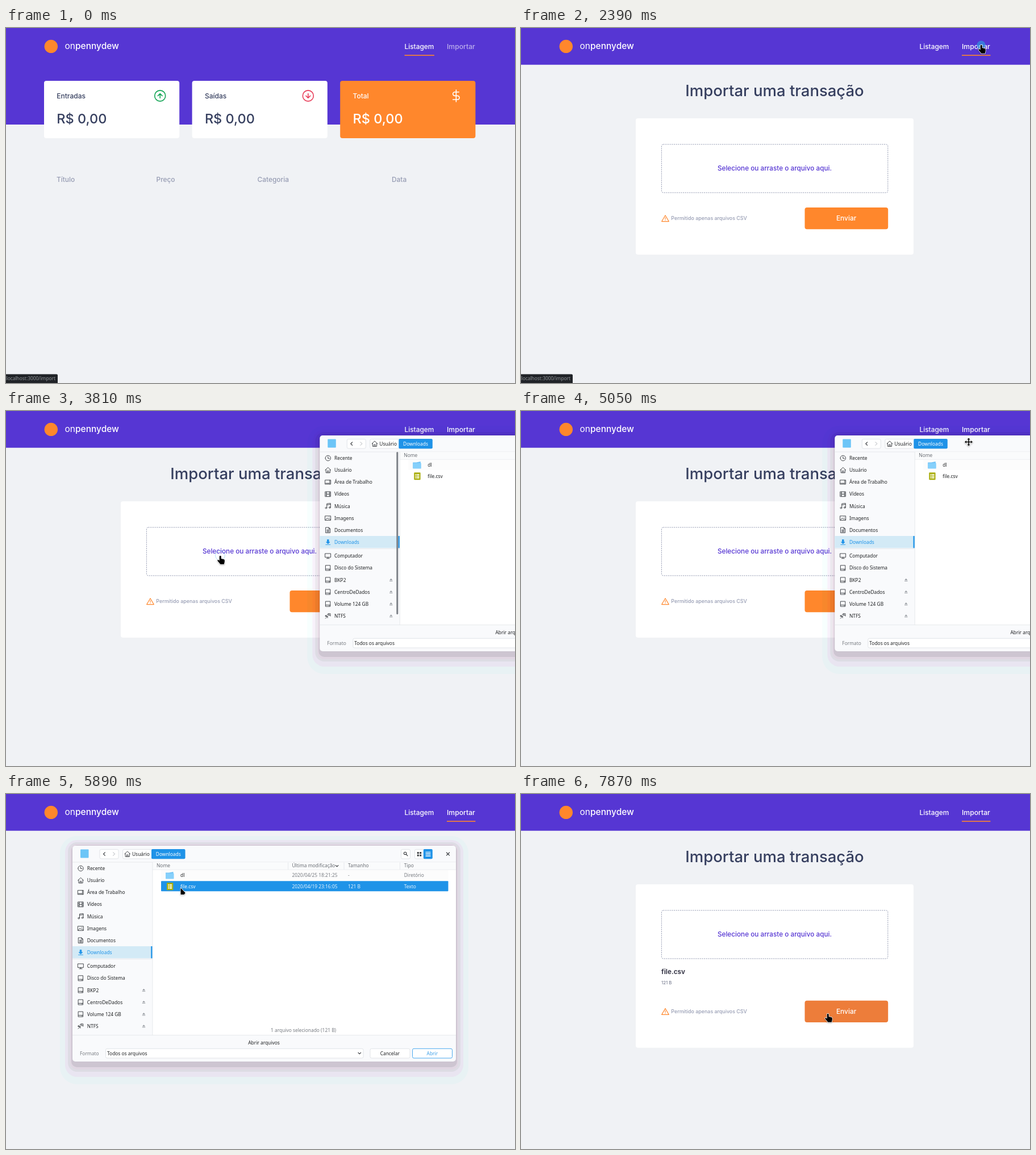
These frames come from a looping animation (896x625 px, 8 s). An HTML page:

```html
<!DOCTYPE html>
<html lang="pt-BR">
<head>
<meta charset="utf-8">
<title>onpennydew</title>
<style>
  html, body { margin: 0; width: 100%; height: 100%; overflow: hidden; background: #f0f2f5; }
  svg { display: block; width: 100%; height: 100%; }
  text { font-family: Inter, "Open Sans", sans-serif; font-weight: 500; white-space: pre; }
  .sys text { font-family: "Noto Sans", "Open Sans", sans-serif; font-size: 8.4px; font-weight: 400; }
  .line { fill: none; stroke-linecap: round; stroke-linejoin: round; }
</style>
</head>
<body>
<svg id="stage" viewBox="0 0 896 625" preserveAspectRatio="none"></svg>
<script>
const LOOP = 8000;
const PURPLE = '#5636d3', ORANGE = '#ff872c', INK = '#363f5f', MUTED = '#969cb3', BLUE = '#1f93e8';

const text = (x, y, s, size, fill, extra = '') =>
  `<text x="${x}" y="${y}" font-size="${size}" fill="${fill}" ${extra}>${s}</text>`;
const rect = (x, y, w, h, fill, r = 0, extra = '') =>
  `<rect x="${x}" y="${y}" width="${w}" height="${h}" rx="${r}" fill="${fill}" ${extra}/>`;
const path = (d, stroke, width = 1, extra = '') =>
  `<path class="line" d="${d}" stroke="${stroke}" stroke-width="${width}" ${extra}/>`;
const group = (id, body, extra = '') => `<g id="${id}" ${extra}>${body}</g>`;
const at = (x, y, body, scale = 1) => `<g transform="translate(${x} ${y}) scale(${scale})">${body}</g>`;
const MID = 'text-anchor="middle"';

// Listing page
const CIRCLE = 'M2 12a10 10 0 1 0 20 0a10 10 0 1 0-20 0';
const UP = CIRCLE + 'M16 12L12 8L8 12M12 16V8';
const DOWN = CIRCLE + 'M8 12L12 16L16 12M12 8V16';
const DOLLAR = 'M12 1V23M17 5H9.5a3.5 3.5 0 0 0 0 7h5a3.5 3.5 0 0 1 0 7H6';

function card(x, label, icon, color, fill, ink) {
  return rect(x, 93, 238.2, 101, fill, 4) +
    text(x + 22.3, 124, label, 12, ink) +
    text(x + 22.3, 168, 'R$ 0,00', 23.5, ink) +
    at(x + 192.8, 108, path(icon, color, 1.7), .95);
}

const listing = rect(0, 0, 896, 170, PURPLE) +
  card(67, 'Entradas', UP, '#12a454', '#fff', INK) +
  card(327.6, 'Saídas', DOWN, '#e83f5b', '#fff', INK) +
  card(588.2, 'Total', DOLLAR, '#fff', ORANGE, '#fff') +
  [['Título', 89], ['Preço', 264.5], ['Categoria', 442.5], ['Data', 679]]
    .map(([s, x]) => text(x, 271, s, 11.9, MUTED)).join('');

// Import page
const importing = rect(0, 0, 896, 64.7, PURPLE) +
  text(446.5, 120, 'Importar uma transação', 27.5, INK, MID) +
  rect(202, 159, 489, 240, '#fff', 4, 'id="panel"') +
  rect(247.4, 204.9, 398.4, 85, 'none', 3, `stroke="${MUTED}" stroke-dasharray="2.2 1.5"`) +
  text(446.5, 251.2, 'Selecione ou arraste o arquivo aqui.', 11.75, PURPLE, MID) +
  group('file', text(247, 317, 'file.csv', 11.6, '#3d3d4d', 'font-weight="700" style="font-weight:700"') +
    text(247, 334.5, '121 B', 7.8, '#7c8194')) +
  group('actions',
    path('M254 329.8L260.3 340.6H247.7ZM254 333.6V336.6M254 338.4V338.6', ORANGE, 1.1) +
    text(264.3, 338.3, 'Permitido apenas arquivos CSV', 8.9, MUTED) +
    rect(499.5, 316, 146.7, 38.3, ORANGE, 4, 'id="send"') +
    text(572.6, 339.3, 'Enviar', 11.9, '#fff', MID));

const header = `<circle cx="79.3" cy="32.4" r="11.7" fill="${ORANGE}"/>` +
  `<text x="103.5" y="37" font-size="15.5" fill="#fff"><tspan style="font-weight:400">on</tspan><tspan>pennydew</tspan></text>` +
  group('navList', text(701.5, 36.9, 'Listagem', 11.9, '#fff') +
    rect(701.5, 47.3, 52.4, 1.6, ORANGE, 0, 'id="lineList"')) +
  group('navImport', text(776, 36.9, 'Importar', 12.2, '#fff') +
    rect(776, 47.3, 50.4, 1.6, ORANGE, 0, 'id="lineImport"'));

// File chooser, drawn from its own top left corner
const DARK = '#33363a', GREY = '#787c82', EDGE = '#e1e4e8';
const HOME = 'M-5 0L0-4.8L5 0M-3.6-1V4.6H3.6V-1M-1.2 4.6V1.4H1.2V4.6';
const DISK = 'M-4-4.5H4V4.5H-4ZM-4 2H4M1.8 3.3H2.4';
const PLACES = [
  ['Recente', 'M-4.7 0a4.7 4.7 0 1 0 9.4 0a4.7 4.7 0 1 0-9.4 0M0-2.8V.4H2.6'],
  ['Usuário', HOME],
  ['Área de Trabalho', 'M-4.8-3.6H4.8V3.6H-4.8ZM3-3.4V3.4M-4 2H2'],
  ['Vídeos', 'M-4.6-4.3H4.6V4.3H-4.6ZM-2.4-4V4M2.4-4V4M-2.4 0H2.4M-4.4-1.6H-2.6M-4.4 1.6H-2.6M2.6-1.6H4.4M2.6 1.6H4.4'],
  ['Música', 'M-2 3V-4.3L4.5-5V2.3M-2-2.2L4.5-3M-2 3.2a1.4 1.2 0 1 0-2.8 0a1.4 1.2 0 1 0 2.8 0M4.5 2.4a1.4 1.2 0 1 0-2.8 0a1.4 1.2 0 1 0 2.8 0'],
  ['Imagens', 'M-4.8-3.8H4.8V3.8H-4.8ZM-4 3L-1.3-.4L.8 2L2.2.6L4 3M1.8-1.6H2.4'],
  ['Documentos', 'M-3.8-4.7H1.6L3.8-2.4V4.7H-3.8ZM1.4-4.5V-2.2H3.6M-2-.4H2M-2 1.3H2M-2 3H2'],
  ['Downloads', 'M-1.3-4V0H-3.2L0 3L3.2 0H1.3V-4ZM-4 4.4H4'],
  ['Computador', 'M-4.8-4.2H4.8V2.3H-4.8ZM-2.6 4.5H2.6M0 2.5V4.3'],
  ['Disco do Sistema', DISK], ['BKP2', DISK], ['CentroDeDados', DISK], ['Volume 124 GB', DISK],
  ['NTFS', 'M-4.4 4.4L2 -2M.4-4H4.2V0ZM-3.2 .3L-1 1L-.6 3.4M-4.2-.8H-2.6V.8H-4.2ZM-1.4-2.4H.2']
];

const places = PLACES.map(([name, icon], i) => {
  const y = 40 + i * 21.12 + (i > 7 ? 3.2 : 0), here = i === 7;
  return (here ? rect(0, y - 10.8, 140, 21.2, '#d3eaf6') + rect(138.2, y - 10.8, 2.3, 21.2, BLUE) : '') +
    at(14.5, y, path(icon, here ? BLUE : DARK, .9, here ? `style="fill:${BLUE}"` : '')) +
    text(25.7, y + 3.1, name, 8.4, here ? BLUE : '#202224') +
    (i > 9 ? `<path d="M122.8 ${y + .6}L125.5 ${y - 2.6}L128.2 ${y + .6}ZM122.8 ${y + 1.5}h5.4v1h-5.4z" fill="#9a9ea4"/>` : '');
}).join('');

const row = (y, cells, first, rest) => cells
  .map((s, i) => text([190, 386.5, 485, 583.7][i], y, s, 8.4, i ? rest : first)).join('');
const FILE_CELLS = ['file.csv', '2020/04/19 23:16:05', '121 B', 'Texto'];
const boxed = (x, y, w, h, stroke = EDGE, extra = '') => rect(x, y, w, h, '#fff', 2.5, `stroke="${stroke}" ${extra}`);

const SHADE = [[22, 17, 40, '#f7fffe'], [13, 10, 27, '#f8f2fb'], [8, 6, 18, '#ebe8ee'],
  [4, 3, 14, '#eee2ec'], [2, 1, 10, '#dad0da']];
const shade = SHADE.map(([side, top, foot, c]) =>
  rect(-side, -top, 675 + side * 2, 380 + top + foot, c, side + 8)).join('');

const chooser = `<g style="mix-blend-mode:multiply">${shade}</g>` +
  rect(0, 0, 675, 380, '#f9fafc', 5) +
  rect(0, 28.5, 675, 1, '#e8eaed') +
  rect(14, 6.5, 14.5, 15, '#6cc5f7', 1) +
  boxed(48, 6.5, 33, 16.5) + path('M57.3 11.8L54.5 14.6L57.3 17.4', DARK, 1.2) + path('M71.7 11.8L74.5 14.6L71.7 17.4', '#a8acb2') +
  boxed(88.5, 6.5, 109.5, 16.5) + at(96.7, 14.7, path(HOME, DARK, .9)) +
  text(105, 17.8, 'Usuário', 8.4, '#202224') +
  rect(139, 6, 59.5, 17.3, BLUE, 2) + text(146.8, 17.8, 'Downloads', 8.4, '#fff') +
  boxed(578.5, 6.5, 16, 16.5) + path('M583.4 13.4a2.2 2.2 0 1 0 4.4 0a2.2 2.2 0 1 0-4.4 0M587.2 15L590 17.8', DARK, 1.1) +
  boxed(602.5, 6.5, 31, 16.5) +
  [606.8, 611.2].map(x => [11.2, 15.6].map(y => rect(x, y, 3, 3, DARK)).join('')).join('') +
  rect(617.8, 6, 16, 17.3, BLUE, 2) + path('M622 11.2H630M622 13.6H630M622 16H630M622 18.4H630', '#fff', 1.1) +
  path('M658.4 12L663.6 17.2M663.6 12L658.4 17.2', DARK, 1.1) +
  rect(141, 29.5, 534, 304, '#fff') + rect(141, 29.5, 534, 12.5, '#fafbfc') +
  rect(141, 41.8, 534, .8, '#e8eaed') + rect(140.5, 29, .8, 304.5, EDGE) +
  [379.3, 477.6, 576.2].map(x => rect(x, 29.5, .8, 12.5, EDGE)).join('') +
  [['Nome', 148], ['Última modificação', 386.5], ['Tamanho', 485], ['Tipo', 583.7]]
    .map(([s, x]) => text(x, 38.4, s, 8.4, '#6b6f75')).join('') +
  path('M463.4 34.6L465.6 36.8L467.8 34.6', DARK, 1.2) +
  places + rect(0, 199.2, 140.5, .8, EDGE) +
  rect(135, 29, 3, 286, '#7c8087', 1.5, 'id="bar"') +
  rect(156, 43, 505.5, 18, '#fcfcfc') +
  row(55.1, ['dl', '2020/04/25 18:21:25', '-', 'Diretório'], '#202224', GREY) +
  `<path d="M164 47.5H170L177.5 46V58H164Z" fill="#6cc1f6"/>` + rect(164, 48.5, 14.5, 10, '#86d0fb', .8) +
  group('plain', row(74.7, FILE_CELLS, '#202224', GREY)) +
  group('picked', rect(156, 62.3, 505.5, 18, BLUE, 1) + row(74.7, FILE_CELLS, '#fff', '#e6f3fd') +
    text(406.6, 328.4, '1 arquivo selecionado (121 B)', 8.4, GREY, MID)) +
  rect(166, 65.2, 11.3, 13, '#a9ad0c', 1) + rect(168.2, 68, 7, 7.8, '#f4f5d4') +
  path('M168.4 70.5H175M168.4 73H175M170.5 68.2V75.6', '#a9ad0c', .7) +
  rect(0, 333.3, 675, .8, EDGE) +
  text(337, 349.5, 'Abrir arquivos', 8.4, '#202224', MID) +
  text(13, 368.6, 'Formato', 8.4, GREY) +
  boxed(58.5, 357.3, 453.5, 16.7) + text(61, 368.6, 'Todos os arquivos', 8.4, '#202224') +
  path('M503 364.4L505.3 366.7L507.6 364.4', DARK, 1.2) +
  boxed(524, 357.3, 70, 16.7) + text(558.8, 368.6, 'Cancelar', 8.4, '#202224', MID) +
  boxed(598.5, 357.3, 70, 16.7, '#4aa9ee', 'id="open"') + text(633.4, 368.6, 'Abrir', 8.4, '#3d9fe8', MID);

// Pointer shapes, with the hot spot at 0,0
const SHAPES = {
  arrow: 'M0 0V11.4H6L8.2 8.4Z',
  hand: 'M-1.3 1.2a1.5 1.5 0 0 1 3 0V5L6.3 6Q7.8 6.4 7.8 8V10.5L6.8 14.8H.4L-4 9.4Q-5.4 7.6-4.2 7Q-3 6.5-1.3 8.6Z',
  move: 'M0-7L2.6-4.2H.8V-.8H4.2V-2.6L7 0L4.2 2.6V.8H.8V4.2H2.6L0 7L-2.6 4.2H-.8V.8H-4.2V2.6L-7 0L-4.2-2.6V-.8H-.8V-4.2H-2.6Z'
};

const stage = document.getElementById('stage');
stage.innerHTML = rect(0, 0, 896, 625, '#f0f2f5') +
  group('listing', listing) + group('importing', importing) + header +
  group('status', rect(-3, 609.5, 94, 20, '#202327', 2) +
    text(.5, 620.2, 'localhost:3000/import', 8.4, '#92969a'), 'class="sys"') +
  group('chooser', chooser, 'class="sys"') +
  '<circle id="ripple"/>' +
  group('pointer', '<path id="glyph" fill="#000" stroke="#fff" stroke-width="1.5" stroke-linejoin="round" paint-order="stroke"/>',
    'style="filter:drop-shadow(0 1px 1px rgba(0,0,0,.3))"');

const el = {};
stage.querySelectorAll('[id]').forEach(n => el[n.id] = n);
const set = (id, attrs) => { for (const k in attrs) el[id].setAttribute(k, attrs[k]); };
const show = (id, on) => set(id, { display: on ? 'inline' : 'none' });

const lerp = (a, b, k) => a + (b - a) * k;
const smooth = k => k * k * (3 - 2 * k);
const ramp = (t, a, b) => Math.min(1, Math.max(0, (t - a) / (b - a)));

// Keys are [time, x, y], eased between neighbours
function follow(keys, t) {
  const i = keys.findIndex(k => k[0] > t);
  if (i === 0) return keys[0].slice(1);
  if (i < 0) return keys[keys.length - 1].slice(1);
  const a = keys[i - 1], b = keys[i], k = smooth(ramp(t, a[0], b[0]));
  return [lerp(a[1], b[1], k), lerp(a[2], b[2], k)];
}

const POINTER = [
  [560, 800, 36], [1040, 423, 441], [1360, 452, 412], [1780, 806, 16], [1890, 810, 30],
  [2430, 810, 30], [3160, 385, 259], [3200, 349, 277], [3340, 349, 277], [3610, 377, 255],
  [3830, 377, 255], [4140, 727, 216], [4500, 752, 150], [4900, 790, 60], [5040, 788, 54.5],
  [5090, 788, 54.5], [5760, 353, 102.5], [5850, 353, 102.5], [5890, 307.5, 165.5],
  [6000, 307.5, 165.5], [6640, 752, 452], [6760, 752, 452], [7480, 729, 449], [7540, 729, 449], [7860, 540, 387]
];
const CHOOSER = [[5090, 552.3, 43], [5760, 117, 91]];
const CLICKS = [[2390, 810, 30], [3610, 377, 254.5]];
const inside = (x, y, l, t, r, b) => x >= l && x <= r && y >= t && y <= b;

function draw(t) {
  const second = t >= 2390, opened = t >= 3770 && t < 6860, loaded = t >= 6960;
  show('listing', !second);
  show('importing', second);
  show('lineList', !second);
  show('lineImport', second);

  const fade = second
    ? ramp(t, 2400, 2560) - ramp(t, 2570, 2770)
    : 1 - ramp(t, 590, 790) + ramp(t, 1690, 1880);
  set('navImport', { opacity: 1 - .4 * fade });

  const bubble = t < 590 ? 1 : t < 1690 ? 1 - ramp(t, 590, 760)
    : t < 2250 ? .9 * ramp(t, 1720, 1860) : 1 - ramp(t, 2600, 2760);
  set('status', { opacity: bubble });

  const drop = loaded ? 47.8 : 0;
  set('panel', { height: 240 + drop });
  set('actions', { transform: `translate(0 ${drop})` });
  show('file', loaded);

  const [dx, dy] = follow(CHOOSER, t);
  show('chooser', opened);
  set('chooser', { transform: `translate(${dx} ${dy})` });
  set('bar', { opacity: 1 - ramp(t, 3900, 4100) });
  show('plain', t < 5890);
  show('picked', t >= 5890);
  set('open', { fill: t > 6540 ? '#e6f3fd' : '#fff' });

  const [x, y] = follow(POINTER, t);
  const overSend = loaded && inside(x, y, 499, 364, 646, 402);
  const link = inside(x, y, 776, 22, 827, 49) ||
    second && inside(x, y, 247, 205, 646, 290) || overSend;
  const covered = opened && x > dx;
  const shape = t > 4860 && t < 5885 ? 'move' : link && !covered ? 'hand' : 'arrow';
  show('pointer', t >= 590);
  set('pointer', { transform: `translate(${x} ${y})` });
  set('glyph', { d: SHAPES[shape] });
  const hot = ramp(t, 7700, 7850);
  set('send', { fill: `rgb(${lerp(255, 237, hot)},${lerp(135, 125, hot)},${lerp(44, 58, hot)})` });

  const click = CLICKS.find(c => t >= c[0] && t < c[0] + 300);
  show('ripple', !!click);
  if (click) {
    const k = (t - click[0]) / 300;
    set('ripple', {
      cx: click[1], cy: click[2], r: 7 + 2 * k, fill: '#2aa5e0', stroke: '#2aa5e0',
      'fill-opacity': .6 * Math.max(0, 1 - k * 1.6), 'stroke-opacity': .6 * (1 - k * .6)
    });
  }
}

function tick() {
  draw(performance.now() % LOOP);
  requestAnimationFrame(tick);
}
tick();
</script>
</body>
</html>
```
